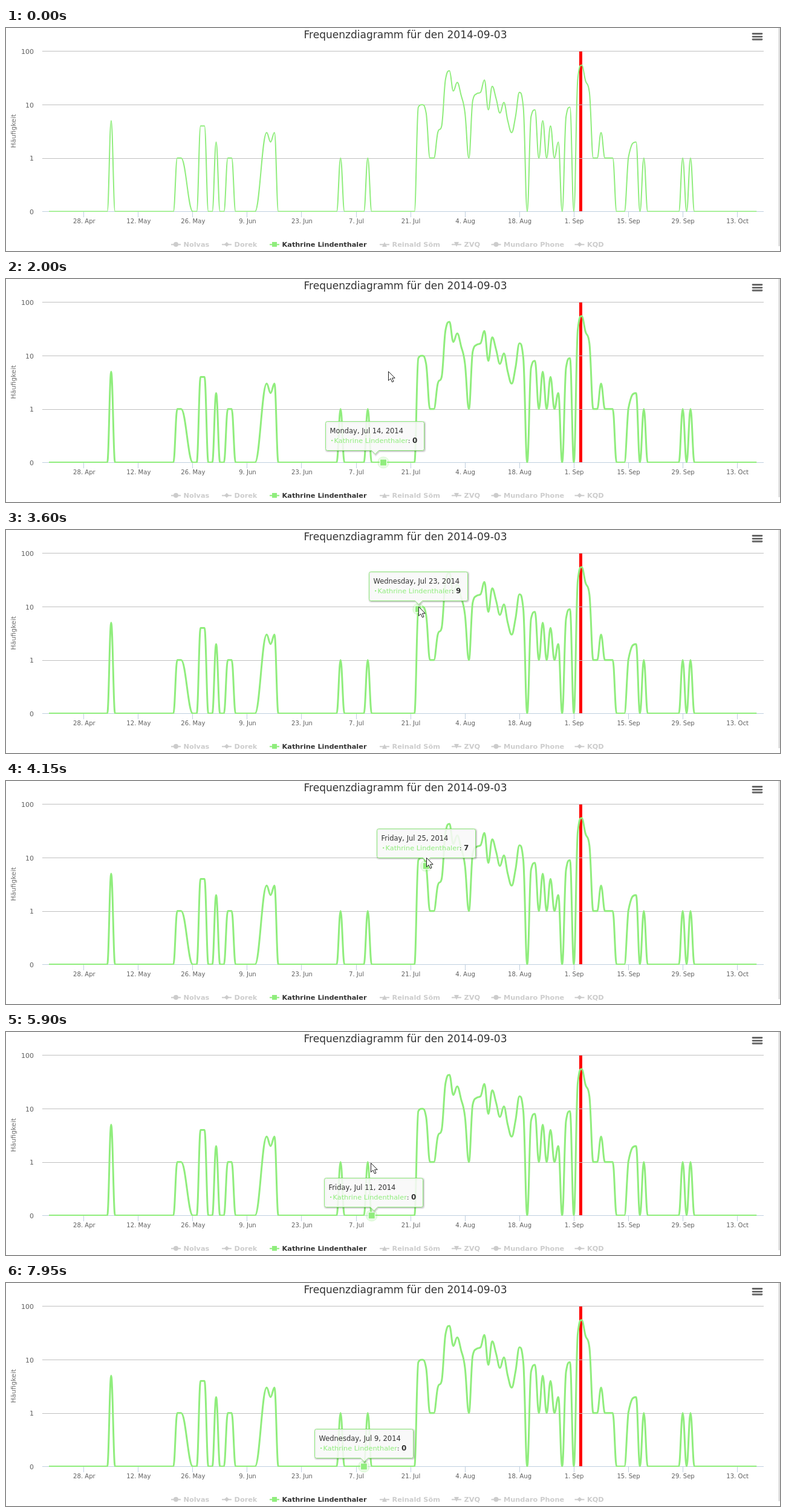
Animation of 1280 by 370 pixels, one loop 8000 ms. Source, as an HTML page:

```html
<!DOCTYPE html>
<html lang="de">
<head>
<meta charset="utf-8">
<title>Frequenzdiagramm</title>
<style>
  html, body { margin: 0; width: 100%; height: 100%; overflow: hidden; background: #fff; }
  svg { display: block; width: 1280px; height: 370px; font-family: "DejaVu Sans", sans-serif; }
</style>
</head>
<body>
<svg id="chart" viewBox="0 0 1280 370"></svg>
<script>
const LOOP = 8000, STEP = 50, HOVER_START = 600;
const GREEN = '#90ed7d', GREY = '#ccc';
const SERIES_NAME = 'Kathrine Lindenthaler';
const FIRST_DAY = -9, LAST_DAY = 173;       // counted from 28 April

const chart = document.getElementById('chart');
const dayX = day => 128.9 + day * 6.43;
const dayAt = x => Math.round((x - 128.9) / 6.43);
const valueY = v => v ? 304.5 - 88.67 * (1 + Math.log10(v)) : 304.5;
const dateOf = day => new Date(Date.UTC(2014, 3, 28 + day));
const datePart = (date, options) => date.toLocaleDateString('en-US', { timeZone: 'UTC', ...options });
const monthOf = date => datePart(date, { month: 'short' });

function add(tag, attrs, parent = chart, text = '') {
  const node = document.createElementNS('http://www.w3.org/2000/svg', tag);
  for (const key in attrs) node.setAttribute(key, attrs[key]);
  node.textContent = text;
  parent.append(node);
  return node;
}
const label = (text, x, y, size, fill, extra = {}, parent = chart) =>
  add('text', { x, y, 'font-size': size, fill, ...extra }, parent, text);
const line = (d, stroke, width = 1, parent = chart, extra = {}) =>
  add('path', { d, stroke, 'stroke-width': width, fill: 'none', ...extra }, parent);

// Runs of non-zero values, keyed by their first day
const runs = {
  7: [5], 24: [1, 1], 30: [4, 4], 34: [2], 37: [1, 1], 47: [3, 2, 3],
  86: [9, 10, 7, 1, 1, 3, 4, 30, 43, 18, 26, 15, 7, 1, 12, 16, 17, 29, 8, 22, 13, 7, 11, 5, 3, 6, 17, 9],
  115: [6, 8, 1, 5, 1, 4, 1, 2], 124: [6, 9],
  127: [30, 55, 28, 17, 1, 1, 3, 1, 1, 1], 140: [1, 0, 2]
};
const singleDays = [66, 73, 144, 154, 156];
const missingDays = [26, 27, 45, 46, 141];
const values = {};
for (const start in runs) runs[start].forEach((v, i) => values[+start + i] = v);
for (const day of singleDays) values[day] = 1;
const valueAt = day => values[day] || 0;

const points = [];
for (let day = FIRST_DAY; day <= LAST_DAY; day++) {
  if (!missingDays.includes(day)) points.push({ x: dayX(day), y: valueY(valueAt(day)) });
}

// Smooth curve whose control points never overshoot the neighbouring values
function splinePath(pts) {
  const mix = (a, b) => (1.5 * a + b) / 2.5;
  const clampTo = (y, a, b) => Math.max(Math.min(a, b), Math.min(Math.max(a, b), y));
  let d = `M${pts[0].x} ${pts[0].y}`, out = pts[0];
  for (let i = 1; i < pts.length; i++) {
    const p = pts[i], prev = pts[i - 1], next = pts[i + 1];
    let left = { x: p.x, y: p.y }, right = p;
    if (next) {
      left = { x: mix(p.x, prev.x), y: mix(p.y, prev.y) };
      right = { x: mix(p.x, next.x), y: mix(p.y, next.y) };
      const shift = (right.y - left.y) * (right.x - p.x) / (right.x - left.x) + p.y - right.y;
      left.y += shift;
      right.y += shift;
      const ly = clampTo(left.y, prev.y, p.y);
      if (ly !== left.y) { left.y = ly; right.y = 2 * p.y - ly; }
      const ry = clampTo(right.y, next.y, p.y);
      if (ry !== right.y) { right.y = ry; left.y = 2 * p.y - ry; }
    }
    d += `C${[out.x, out.y, left.x, left.y, p.x, p.y].map(n => n.toFixed(2)).join(' ')}`;
    out = right;
  }
  return d;
}

// Frame, axes and titles
label('Frequenzdiagramm für den 2014-09-03', 660.5, 17, 17.05, '#333', { 'text-anchor': 'middle' });
label('Häufigkeit', 0, 0, 11, '#707070',
  { 'text-anchor': 'middle', transform: 'translate(15.5 171) rotate(-90)' });
line('M1235 9.5h15M1235 14.3h15M1235 19h15', '#666', 2.8, chart, { 'stroke-linecap': 'round' });
line('M1278.5 0V362', '#b4b4b4');
line('M950.5 38V304', '#f00', 5);
line('M60 38.5H1253M60 127.5H1253M60 216.5H1253', '#c0c0c0');
line('M60 304.5H1253', '#c0d0e0');
[100, 10, 1, 0].forEach((v, i) =>
  label(v, 46, 43 + i * 88.7, 11, '#606060', { 'text-anchor': 'end' }));
for (let day = 0; day < LAST_DAY; day += 14) {
  const x = dayX(day), date = dateOf(day);
  line(`M${Math.floor(x) + .5} 305V314`, '#c0d0e0');
  label(`${date.getUTCDate()}. ${monthOf(date)}`, x + .5, 324, 10.1, '#606060', { 'text-anchor': 'middle' });
}

// The plot area cuts the lower half of the zero line
const plotArea = add('clipPath', { id: 'plot' });
add('rect', { x: 60, y: 38, width: 1193, height: 267 }, plotArea);
const curve = line(splinePath(points), GREEN, 2, chart,
  { 'stroke-linejoin': 'round', 'clip-path': 'url(#plot)' });

// Legend
const symbols = {
  circle: 'M-4 0a4 4 0 1 0 8 0a4 4 0 1 0 -8 0',
  diamond: 'M0 -4L4 0L0 4L-4 0Z',
  square: 'M-4 -4H4V4H-4Z',
  up: 'M0 -4L4 4H-4Z',
  down: 'M-4 -4H4L0 4Z'
};
[['Nolvas', 281, 'circle'], ['Dorek', 365, 'diamond'], [SERIES_NAME, 444, 'square'],
 ['Reinald Söm', 626, 'up'], ['ZVQ', 745, 'down'], ['Mundaro Phone', 810.5, 'circle'],
 ['KQD', 948.5, 'diamond']].forEach(([text, x, symbol]) => {
  const active = text === SERIES_NAME, color = active ? GREEN : GREY;
  const item = add('g', { transform: `translate(${x} 359)` });
  line('M-8 0.3H8', color, 2, item);
  add('path', { d: symbols[symbol], fill: color }, item);
  label(text, 12.5, 4.3, 11.3, active ? '#333' : GREY, { 'font-weight': 'bold' }, item);
});

// Hover marker, tooltip and pointer
const marker = add('g', {});
add('circle', { r: 10, fill: GREEN, 'fill-opacity': .25 }, marker);
add('rect', { x: -5.5, y: -5.5, width: 11, height: 11, fill: GREEN, stroke: '#fff' }, marker);

const tooltip = add('g', {});
const bubble = 'M3 0H160Q163 0 163 3V45Q163 48 160 48H88L82 54L76 48H3Q0 48 0 45V3Q0 0 3 0Z';
for (const width of [5, 3, 1]) {
  line(bubble, '#000', width, tooltip, { 'stroke-opacity': .3 / (width + 1), transform: 'translate(1 1)' });
}
add('path', { d: bubble, fill: '#f9f9f9', 'fill-opacity': .87, stroke: GREEN }, tooltip);
const dateText = label('', 7, 19.8, 11.5, '#333', {}, tooltip);
label('·', 8.5, 35, 11.3, GREEN, { 'font-weight': 'bold' }, tooltip);
const row = label('', 14, 35, 11.3, '#333', {}, tooltip);
add('tspan', { fill: GREEN }, row, SERIES_NAME);
add('tspan', {}, row, ': ');
const valueText = add('tspan', { 'font-weight': 'bold', 'font-size': 12 }, row);

const pointer = add('path', {
  d: 'M0.5 0.5V15.5L4 12.2L6.5 18L9 17L6.6 11.3H11.2Z', fill: '#fff', stroke: '#222'
});

// Key points of the pointer tip: [time, x, y]
const pointerPath = [
  [300, 895, 364], [500, 722, 312], [1200, 603, 262], [1500, 572, 250], [1800, 572, 230],
  [2000, 632, 153], [2250, 695, 128], [2900, 695, 128], [3100, 682, 127], [3600, 682, 127],
  [3800, 695, 127], [4780, 695, 127], [4850, 681, 129], [5100, 655, 133], [5350, 617, 205],
  [5700, 617, 205], [5900, 603, 217], [6050, 597, 218], [6700, 597, 218], [6800, 594, 223],
  [7500, 593, 225], [LOOP, 592, 245]
];

function pointerAt(t) {
  const i = Math.max(1, pointerPath.findIndex(key => key[0] > t));
  const [t0, x0, y0] = pointerPath[i - 1], [t1, x1, y1] = pointerPath[i];
  const k = Math.max(0, (t - t0) / (t1 - t0));
  return { x: x0 + (x1 - x0) * k, y: y0 + (y1 - y0) * k };
}
const pointerShown = t => t >= 300 && t < LOOP - STEP && (t < 1150 || t >= 2000);

// The hovered day follows the pointer with a short delay
const hoveredDay = t => dayAt(pointerAt(t - 25).x);
const tooltipGoal = day => ({ x: dayX(day) - 81.5, y: valueY(valueAt(day)) - 62 });

// The tooltip chases the hovered point with exponential easing
function tooltipAt(t) {
  const tick = 5, ease = 1 - Math.exp(-tick / 50);
  const pos = tooltipGoal(hoveredDay(HOVER_START));
  for (let time = HOVER_START; time < t; time += tick) {
    const goal = tooltipGoal(hoveredDay(time));
    pos.x += (goal.x - pos.x) * ease;
    pos.y += (goal.y - pos.y) * ease;
  }
  return pos;
}

const show = (node, on) => node.setAttribute('visibility', on ? 'visible' : 'hidden');
const move = (node, x, y) => node.setAttribute('transform', `translate(${x} ${y})`);

function draw(t) {
  const hovering = t >= HOVER_START;
  curve.setAttribute('stroke-width', hovering ? 3 : 2);
  show(marker, hovering);
  show(tooltip, hovering);
  if (hovering) {
    const day = hoveredDay(t), date = dateOf(day), box = tooltipAt(t);
    move(marker, dayX(day), valueY(valueAt(day)));
    move(tooltip, Math.round(box.x) + .5, Math.round(box.y) + .5);
    dateText.textContent =
      `${datePart(date, { weekday: 'long' })}, ${monthOf(date)} ${date.getUTCDate()}, 2014`;
    valueText.textContent = valueAt(day);
  }
  const tip = pointerAt(t);
  show(pointer, pointerShown(t));
  move(pointer, Math.round(tip.x), Math.round(tip.y));
}

const begin = performance.now();
let drawn = -1;
function frame() {
  const t = Math.floor((performance.now() - begin) % LOOP / STEP) * STEP;
  if (t !== drawn) draw(drawn = t);
  requestAnimationFrame(frame);
}
frame();
</script>
</body>
</html>
```
